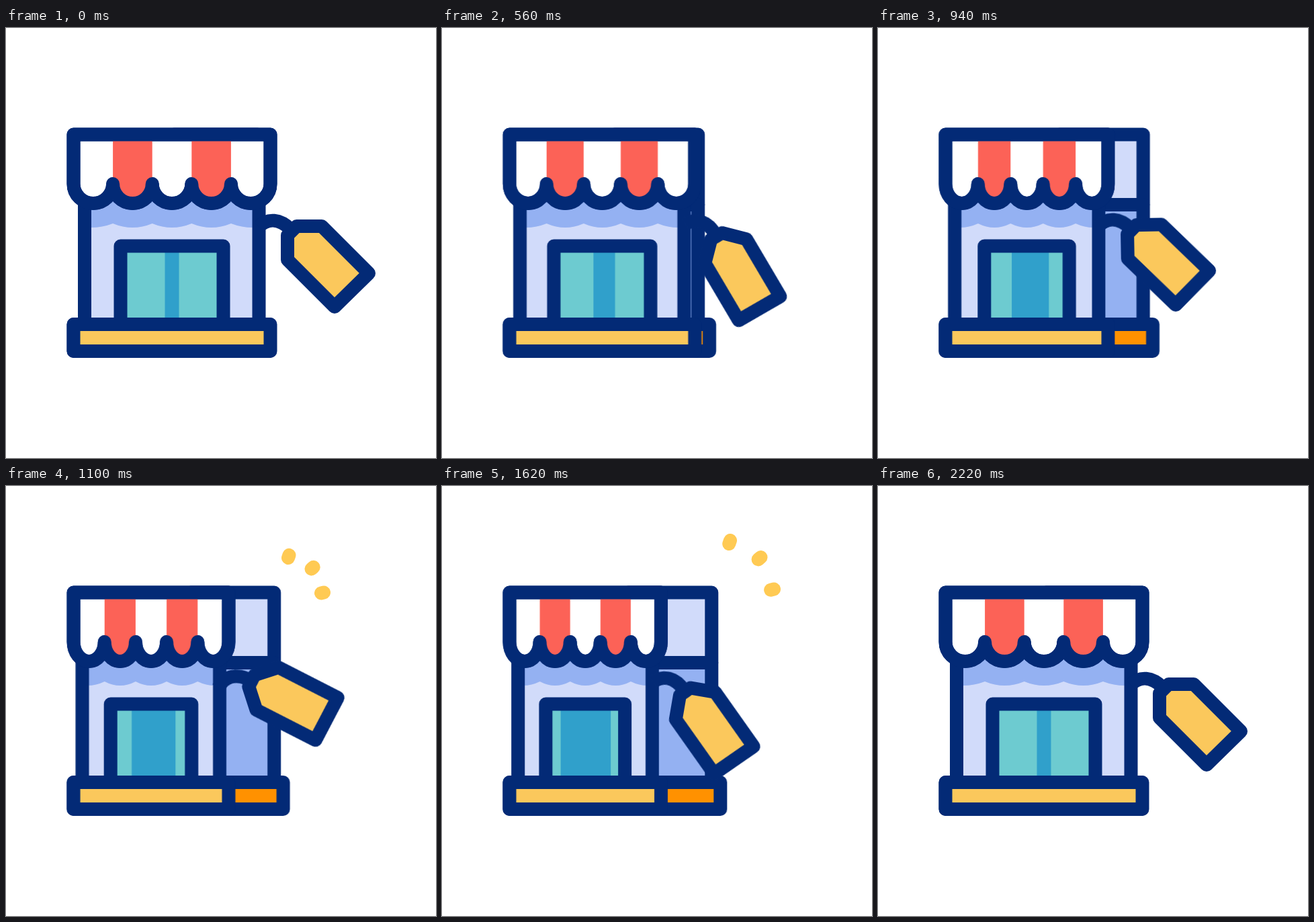
An HTML page for the animation above (2.4 s loop, 640 by 640 pixels).

```html
<!DOCTYPE html>
<html lang="en">
<head>
<meta charset="utf-8">
<title>Shop with swinging tag</title>
<style>
  html, body { margin: 0; width: 100%; height: 100%; overflow: hidden; background: #fff; }
  svg { display: block; width: 640px; height: 640px; }

  .line {
    stroke: #032a76; stroke-width: 20; stroke-linejoin: round;
    vector-effect: non-scaling-stroke;
  }
  .none { fill: none; }
  .white { fill: #fff; }
  .pale { fill: #d1dbfa; }
  .mid { fill: #94b1f2; }
  .teal { fill: #6dcbd0; }
  .blue { fill: #30a0cb; }
  .red { fill: #fc6257; }
  .gold { fill: #fbc85c; }
  .orange { fill: #ff9100; }

  /* The shop turns: the front narrows while the side slides out. */
  .front, .side, .base, .left, .right, .hang, .swing, .spark {
    animation: 2400ms infinite;
    --ease: cubic-bezier(.333, 0, .667, 1);
    animation-timing-function: var(--ease);
  }
  .front { animation-name: front; transform-origin: 100.5px 0; }
  .side { animation-name: side; }
  .base { animation-name: base; transform-origin: 100.5px 0; }
  .left { animation-name: left; transform-origin: 170.5px 0; }
  .right { animation-name: right; transform-origin: 323.5px 0; }
  .hang { animation-name: hang; }
  .swing { animation-name: swing; transform-origin: 392px 302px; }
  .spark {
    animation-name: spark;
    fill: none; stroke: #ffca53; stroke-width: 20; stroke-linecap: round;
  }

  @keyframes front {
    0%, 8.333%, 92.083%, 100% { transform: scaleX(1); }
    54.167%, 66.25% { transform: scaleX(.768); }
  }
  @keyframes side {
    0%, 8.333%, 92.083%, 100% { transform: translateX(0); }
    54.167%, 66.25% { transform: translateX(27.2px); }
  }
  @keyframes base {
    0%, 8.333%, 92.083%, 100% { transform: scaleX(1); }
    54.167%, 66.25% { transform: scaleX(1.0753); }
  }
  @keyframes left {
    0%, 92.083%, 100% { transform: scaleX(1); }
    8.333% { transform: scaleX(1); animation-timing-function: cubic-bezier(.4, 0, .7, .3); }
    54.167% { transform: scaleX(.37); }
    66.25% { transform: scaleX(.37); animation-timing-function: cubic-bezier(.3, .7, .6, 1); }
  }
  @keyframes right {
    0%, 8.333%, 92.083%, 100% { transform: scaleX(1); }
    54.167%, 66.25% { transform: scaleX(.409); }
  }
  @keyframes hang {
    0%, 8.333%, 92.083%, 100% { transform: translate(0, 0); }
    54.167%, 66.25% { transform: translate(-64px, -1.5px); }
  }
  @keyframes swing {
    0%, 8.333%, 92.083%, 100% { transform: rotate(0deg); }
    29.167% { transform: rotate(17.8deg); }
    50% { transform: rotate(-22deg); }
    70.833% { transform: rotate(12deg); }
  }
  /* Each spark draws outward, then its tail catches up. */
  @keyframes spark {
    0%, 41.66% { stroke-dasharray: 0 3; stroke-dashoffset: 0; opacity: 0; }
    41.667% { stroke-dasharray: 0 3; stroke-dashoffset: 0; opacity: 1; }
    58.333%, 59.167% { stroke-dasharray: 1 3; stroke-dashoffset: 0; opacity: 1; }
    70.833% { stroke-dasharray: 0 3; stroke-dashoffset: -1; opacity: 1; }
    70.84%, 100% { stroke-dasharray: 0 3; stroke-dashoffset: -1; opacity: 0; }
  }
</style>
</head>
<body>
<svg viewBox="0 0 640 640">
  <g class="side">
    <rect class="line pale" x="250" y="158.5" width="124.3" height="104.5"/>
    <rect class="line mid" x="250" y="263" width="124.3" height="178"/>
  </g>

  <rect class="base line orange" x="100.5" y="441" width="292" height="40"/>

  <g class="front">
    <rect class="pale" x="117" y="240" width="259.5" height="201"/>
    <path class="mid" d="M117 240V296.5Q138 299 159.1 291q29.3 12 58.6 0q29.3 12 58.6 0q29.3 12 58.6 0Q356 299 376.5 296.5V240Z"/>
    <rect class="line none" x="117" y="240" width="259.5" height="201"/>

    <rect class="blue" x="170.5" y="324.5" width="153" height="116.5"/>
    <rect class="left teal" x="170.5" y="324.5" width="66" height="116.5"/>
    <rect class="right teal" x="257.5" y="324.5" width="66" height="116.5"/>
    <rect class="line none" x="170.5" y="324.5" width="153" height="116.5"/>

    <path id="awning" class="line white" d="M100.5 158.5V232a29.3 29 0 0 0 58.6 0a29.3 29 0 0 0 58.6 0a29.3 29 0 0 0 58.6 0a29.3 29 0 0 0 58.6 0a29.3 29 0 0 0 58.6 0V158.5Z"/>
    <path class="red" d="M159.1 158.5V232a29.3 29 0 0 0 58.6 0V158.5ZM276.3 158.5V232a29.3 29 0 0 0 58.6 0V158.5Z"/>
    <path class="line none" d="M100.5 158.5V232a29.3 29 0 0 0 58.6 0a29.3 29 0 0 0 58.6 0a29.3 29 0 0 0 58.6 0a29.3 29 0 0 0 58.6 0a29.3 29 0 0 0 58.6 0V158.5Z"/>

    <rect class="line gold" x="100.5" y="441" width="293" height="40"/>
  </g>

  <g class="hang">
    <g class="swing">
      <path class="line none" d="M376 296C390 282 408 284 424 300"/>
      <path class="line gold" d="M419 308.5L432.5 295H470L540 365L489 415L419 345Z"/>
    </g>
  </g>

  <path class="spark" pathLength="1" d="M420 107L429 81"/>
  <path class="spark" pathLength="1" d="M454.5 123.5L474.5 106"/>
  <path class="spark" pathLength="1" d="M469 159.5L494 153.5"/>
</svg>
</body>
</html>
```
